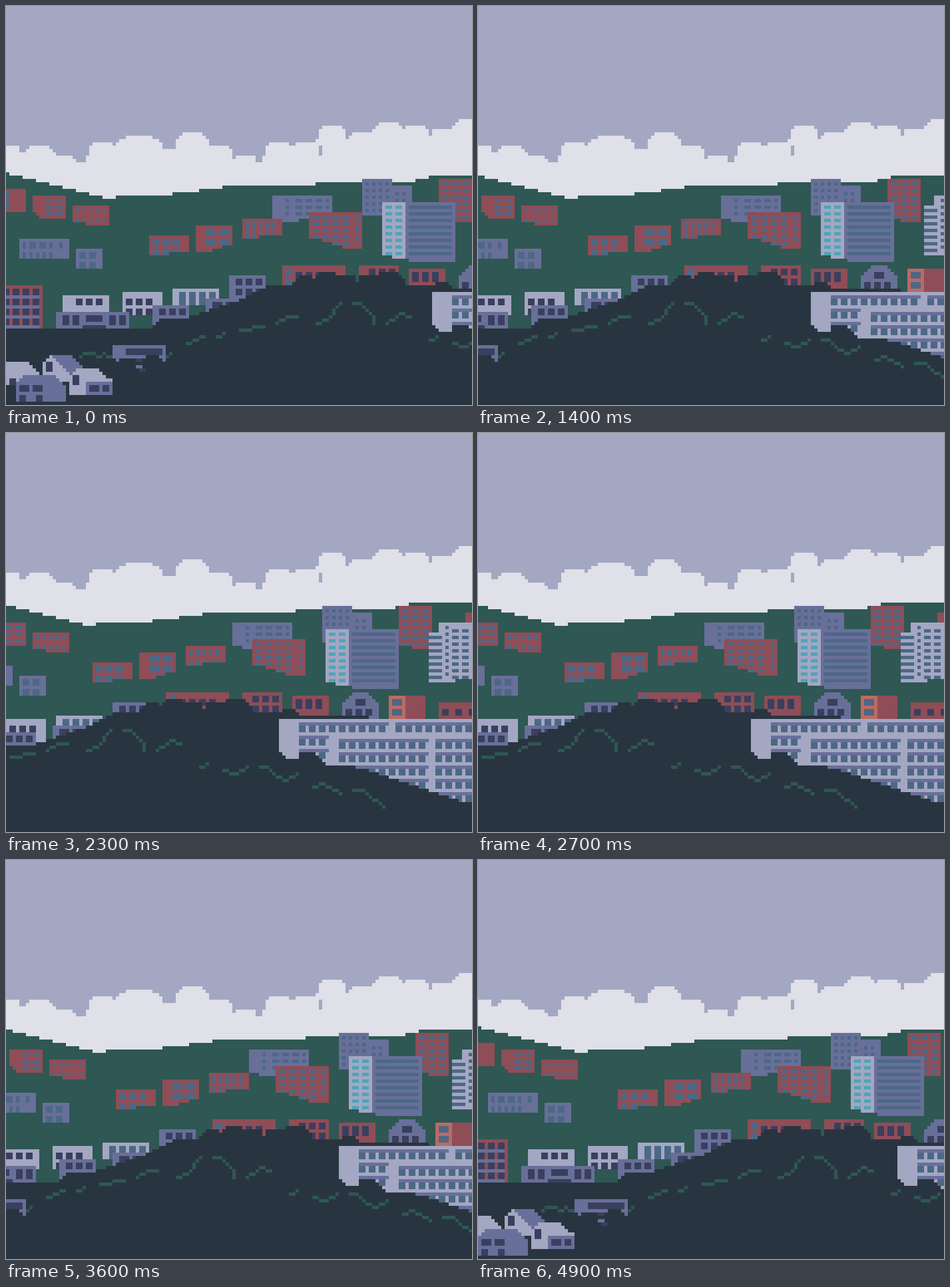
Write an HTML page with a canvas that moves like this. It is 700 px wide and 600 px high and loops after 4.92 s.

```html
<!DOCTYPE html>
<html lang="en">
<head>
<meta charset="utf-8">
<title>Hillside town</title>
<style>
html, body { margin: 0; width: 100%; height: 100%; overflow: hidden; background: #a3a7c2; }
canvas { display: block; width: 700px; height: 600px; }
</style>
</head>
<body>
<canvas id="stage" width="700" height="600"></canvas>
<script>
const CELL = 5, COLS = 140, ROWS = 120;
const LOOP = 4920, STEP = 100, TURN = 25;
const SKY = '#a3a7c2', CLOUD = '#dfe0e8', GREEN = '#2f5753', DARK = '#283540';
const PURPLE = '#686f99', RED = '#8f4d57', SALMON = '#bd6a62', LIGHT = '#a3a7c2';
const BLUE = '#4c6885', NIGHT = '#3a3f5e', CYAN = '#4fa4b8';
const ctx = document.getElementById('stage').getContext('2d');

function box(color, x, y, w, h) {
  ctx.fillStyle = color;
  ctx.fillRect(x, y, w, h);
}

// As many whole panes as fit into the area
function panes(color, x, y, w, h, pw, ph, gapX = 1, gapY = 1) {
  for (let px = x; px + pw <= x + w; px += pw + gapX)
    for (let py = y; py + ph <= y + h; py += ph + gapY) box(color, px, py, pw, ph);
}

// A block with panes one cell inside its walls
function building(wall, glass, x, y, w, h, ...pane) {
  box(wall, x, y, w, h);
  panes(glass, x + 1, y + 1, w - 2, h - 1, ...pane);
}

// Office floors: a ledge above a row of windows
function floors(x, y, w, n) {
  for (let i = 0; i < n; i++, y += 4) {
    box(PURPLE, x, y, w, 1);
    panes(BLUE, x, y + 1, w, 2, 2, 2);
  }
}

// Rows that widen downwards
function roof(color, x, y, w, n, left = 1, right = 1) {
  for (let i = 0; i < n; i++) box(color, x - i * left, y + i, w + i * (left + right), 1);
}

// Grass stairs over a lower edge; a negative rise climbs to the left
function slope(x, bottom, w, rise) {
  for (let i = 0; i < w; i++) {
    const part = rise > 0 ? i + 1 : w - i;
    const h = Math.ceil(Math.abs(rise) * part / w);
    box(GREEN, x + i, bottom - h, 1, h);
  }
}

// Ground below a line through a few points
function ridge(color, ...points) {
  for (let i = 1; i < points.length; i++) {
    const [x0, y0] = points[i - 1], [x1, y1] = points[i];
    for (let x = x0; x < x1; x++) {
      const y = Math.floor(y0 + (y1 - y0) * (x - x0) / (x1 - x0));
      box(color, x, y, 1, ROWS - y);
    }
  }
}

// Round crowns: centre, top, radius
function puffs(color, ...list) {
  for (const [c, top, r] of list)
    for (let x = Math.ceil(c - r - 0.5); x + 0.5 <= c + r; x++) {
      const y = Math.floor(top + r - Math.sqrt(r * r - (x + 0.5 - c) ** 2));
      box(color, x, y, 1, ROWS - y);
    }
}

// Thin line of cells through points x, y, x, y, ...
function trail(...p) {
  for (let i = 0; i + 3 < p.length; i += 2) {
    const dx = p[i + 2] - p[i], dy = p[i + 3] - p[i + 1];
    const n = Math.max(Math.abs(dx), Math.abs(dy));
    for (let s = 0; s <= n; s++)
      box(GREEN, p[i] + Math.round(dx * s / n), p[i + 1] + Math.round(dy * s / n), 1, 1);
  }
}

function sky() {
  box(SKY, 0, 0, COLS, ROWS);
  box(CLOUD, 0, 47, COLS, ROWS);
  puffs(CLOUD, [1, 42, 4], [10, 42, 5], [17.5, 45, 4], [29, 41, 4.5], [40, 39, 9], [49, 43, 3],
    [56, 38, 5], [64, 42, 4.5], [72, 45, 4], [82, 41, 4.5], [90, 41, 4.5], [98, 36, 4.5],
    [107, 38, 4.5], [115, 35, 5], [123, 36, 4.5], [131, 37, 4], [139, 34, 5]);
  box(SKY, 94, 42, 1, 3);
}

function farHill() {
  ridge(GREEN, [0, 50.9], [30, 58.3], [33, 57.99], [50, 56.99], [65, 54.99], [93, 53.99],
    [123, 52.99], [127, 51.9], [200, 51.1]);
}

function upperTown() {
  box(RED, -6, 55, 12, 7);
  panes(BLUE, 0, 56, 1, 5, 1, 2);

  box(RED, 8, 57, 10, 7);
  panes(BLUE, 12, 58, 5, 5, 2, 1);
  slope(8, 64, 2, -2);

  building(RED, BLUE, 20, 60, 11, 6, 1, 1, 1, 2);
  slope(20, 66, 4, -1);

  box(PURPLE, 80, 57, 18, 8);
  panes(BLUE, 84, 58, 13, 5, 1, 1, 11);
  panes(BLUE, 87, 58, 8, 5, 2, 1);
  slope(80, 65, 3, -1);
  slope(88, 65, 10, 1);

  building(PURPLE, BLUE, 107, 52, 9, 11, 1, 1);
  box(PURPLE, 116, 54, 6, 9);
  panes(BLUE, 117, 56, 4, 3, 1, 1);

  building(RED, BLUE, 130, 52, 10, 13, 2, 1);
  slope(130, 65, 4, -1);
  box(RED, 150, 54, 10, 4);
}

function middleTown() {
  building(RED, BLUE, 43, 69, 12, 6, 2, 2);
  slope(49, 75, 6, 1);

  box(RED, 57, 66, 11, 8);
  panes(BLUE, 60, 67, 7, 5, 3, 2);
  slope(62, 74, 6, 2);

  building(RED, BLUE, 71, 64, 12, 6, 1, 2);
  slope(76, 70, 7, 1);

  box(PURPLE, 4, 70, 15, 6);
  panes(BLUE, 7, 71, 5, 2, 2, 2);
  panes(BLUE, 5, 71, 12, 2, 1, 2, 7);
  panes(BLUE, 16, 71, 1, 2, 1, 2);
  panes(BLUE, 5, 74, 9, 2, 1, 2);

  building(PURPLE, BLUE, 21, 73, 8, 6, 2, 2);

  box(RED, 91, 62, 16, 11);
  panes(BLUE, 92, 63, 11, 9, 2, 1);
  panes(BLUE, 105, 63, 1, 8, 1, 2);
  slope(91, 73, 10, -3);

  building(LIGHT, CYAN, 113, 59, 7, 17, 2, 1);
  slope(113, 76, 3, -1);
  box(PURPLE, 120, 59, 15, 18);
  panes(BLUE, 121, 60, 13, 15, 13, 1);
  slope(120, 77, 1, -1);

  box(LIGHT, 144, 60, 16, 15);
  box(LIGHT, 147, 57, 13, 3);
  panes(BLUE, 144, 61, 4, 13, 4, 1);
  panes(BLUE, 149, 58, 1, 16, 1, 1);
  panes(BLUE, 151, 59, 9, 15, 2, 1);
  slope(152, 75, 8, 1);
}

function lowerTown() {
  box(RED, -8, 84, 19, 15);
  panes(PURPLE, -8, 87, 18, 10, 18, 1, 1, 2);
  panes(NIGHT, -1, 85, 11, 14, 2, 2);

  box(LIGHT, 17, 87, 14, 6);
  panes(NIGHT, 21, 88, 8, 2, 2, 2);
  box(LIGHT, 35, 86, 12, 7);
  panes(NIGHT, 36, 88, 8, 5, 2, 2);
  box(LIGHT, 50, 85, 14, 5);
  panes(BLUE, 52, 86, 11, 4, 2, 4);
  box(PURPLE, 67, 81, 11, 8);
  panes(NIGHT, 69, 82, 8, 5, 2, 2);

  box(RED, 83, 78, 19, 7);
  panes(BLUE, 84, 79, 2, 5, 2, 2);
  panes(NIGHT, 87, 80, 12, 2, 2, 2);
  box(RED, 106, 78, 12, 7);
  panes(NIGHT, 109, 79, 8, 5, 2, 2);
  building(RED, NIGHT, 121, 79, 11, 7, 2, 3);

  roof(PURPLE, 139, 78, 5, 4);
  box(PURPLE, 136, 82, 11, 4);
  box(NIGHT, 140, 80, 3, 2);
  panes(NIGHT, 137, 83, 9, 2, 2, 2);

  building(SALMON, BLUE, 150, 79, 5, 7, 3, 2);
  box(RED, 155, 79, 6, 7);
  box(RED, 165, 81, 16, 5);
  panes(NIGHT, 166, 83, 14, 2, 2, 2, 2);
}

function offices() {
  box(LIGHT, 128, 86, 72, 30);
  floors(134, 87, 27, 1);
  floors(163, 87, 37, 1);
  floors(134, 91, 9, 2);
  floors(146, 92, 27, 5);
  floors(175, 92, 25, 5);
}

function nearHill() {
  box(PURPLE, 15, 92, 22, 7);
  panes(NIGHT, 17, 93, 5, 3, 2, 3);
  panes(NIGHT, 31, 93, 5, 3, 2, 3);
  box(NIGHT, 24, 93, 5, 2);
  box(NIGHT, 23, 96, 7, 1);
  box(PURPLE, 44, 90, 11, 6);
  panes(NIGHT, 46, 91, 8, 2, 2, 2);
  box(PURPLE, 60, 88, 10, 6);
  panes(NIGHT, 62, 89, 7, 2, 3, 2);

  ridge(DARK, [-20, 97.9], [43, 97], [46, 94.9], [54, 94], [61, 91.9], [70, 88.9], [78, 84.9],
    [86, 84], [107, 83], [121, 84.5], [200, 88]);
  puffs(DARK, [81, 84, 3], [90, 81.5, 4], [96.5, 80, 5], [102, 81, 4], [109, 81, 4],
    [115, 80, 5], [124, 84, 4], [131, 83, 3.5]);
  offices();
  ridge(DARK, [128, 96.2], [130, 98.2], [133, 98], [134, 96], [139, 97.2], [142, 100.3],
    [151, 101], [173, 108], [183, 111.5], [200, 113]);
}

function houses() {
  roof(LIGHT, -6, 107, 13, 4, 0, 1);
  box(LIGHT, -8, 111, 18, 3);
  box(NIGHT, 1, 112, 2, 2);

  roof(PURPLE, 13, 105, 7, 4, 0, 1);
  box(PURPLE, 13, 109, 10, 3);
  roof(LIGHT, 13, 105, 1, 3);
  roof(LIGHT, 11, 108, 6, 3, 0, 1);
  box(LIGHT, 11, 111, 8, 2);
  box(NIGHT, 12, 107, 2, 3);

  roof(LIGHT, 21, 109, 7, 3);
  box(LIGHT, 19, 112, 13, 5);
  box(NIGHT, 20, 111, 2, 3);
  box(PURPLE, 24, 113, 8, 4);
  box(NIGHT, 25, 114, 3, 2);
  box(NIGHT, 29, 114, 2, 2);

  roof(PURPLE, 5, 111, 10, 3);
  box(PURPLE, 3, 114, 15, 5);
  panes(NIGHT, 4, 114, 7, 2, 3, 2);
  panes(NIGHT, 4, 117, 7, 2, 2, 2, 3);
}

function bridge() {
  box(PURPLE, 32, 102, 16, 4);
  box(NIGHT, 36, 103, 11, 2);
  box(DARK, 42, 105, 4, 1);
  panes(PURPLE, 33, 106, 15, 1, 1, 1, 13);
  box(NIGHT, 39, 106, 2, 1);
  box(PURPLE, 39, 108, 2, 1);
  box(NIGHT, 40, 109, 2, 1);
}

function front() {
  trail(22, 105, 23, 104, 26, 104);
  trail(27, 105, 29, 104, 31, 105);
  trail(48, 105, 49, 104);
  trail(54, 101, 59, 99);
  trail(63, 99, 65, 98);
  trail(70, 97, 77, 96);
  trail(81, 95, 84, 93, 87, 93);
  trail(93, 95, 96, 94, 100, 89);
  trail(104, 89, 106, 89, 110, 93, 110, 95);
  trail(114, 95, 118, 92, 121, 93);
  trail(127, 100, 129, 99);
  trail(134, 101, 137, 102, 141, 100);
  trail(145, 100, 147, 100, 150, 103, 153, 104, 156, 102);
  trail(161, 106, 164, 105, 169, 108);
  trail(173, 107, 176, 107, 182, 112);
  houses();
  bridge();
}

// Each layer with its shift in cells after k steps
const LAYERS = [
  [sky, k => 0],
  [farHill, k => Math.ceil(k * 0.25 - 0.5)],
  [upperTown, k => Math.ceil(k * 0.5)],
  [middleTown, k => Math.ceil(k * 0.75 - 0.5)],
  [lowerTown, k => Math.ceil(k * 1.5)],
  [nearHill, k => k * 2],
  [front, k => k * 3]
];

function draw(k) {
  for (const [layer, shift] of LAYERS) {
    ctx.setTransform(CELL, 0, 0, CELL, -shift(k) * CELL, 0);
    layer();
  }
}

// The view pans right, then back again
let shown = -1;
function tick() {
  const n = Math.floor(performance.now() % LOOP / STEP);
  const k = n <= TURN ? n : 2 * TURN - n;
  if (k !== shown) draw(shown = k);
  requestAnimationFrame(tick);
}
tick();
</script>
</body>
</html>
```
